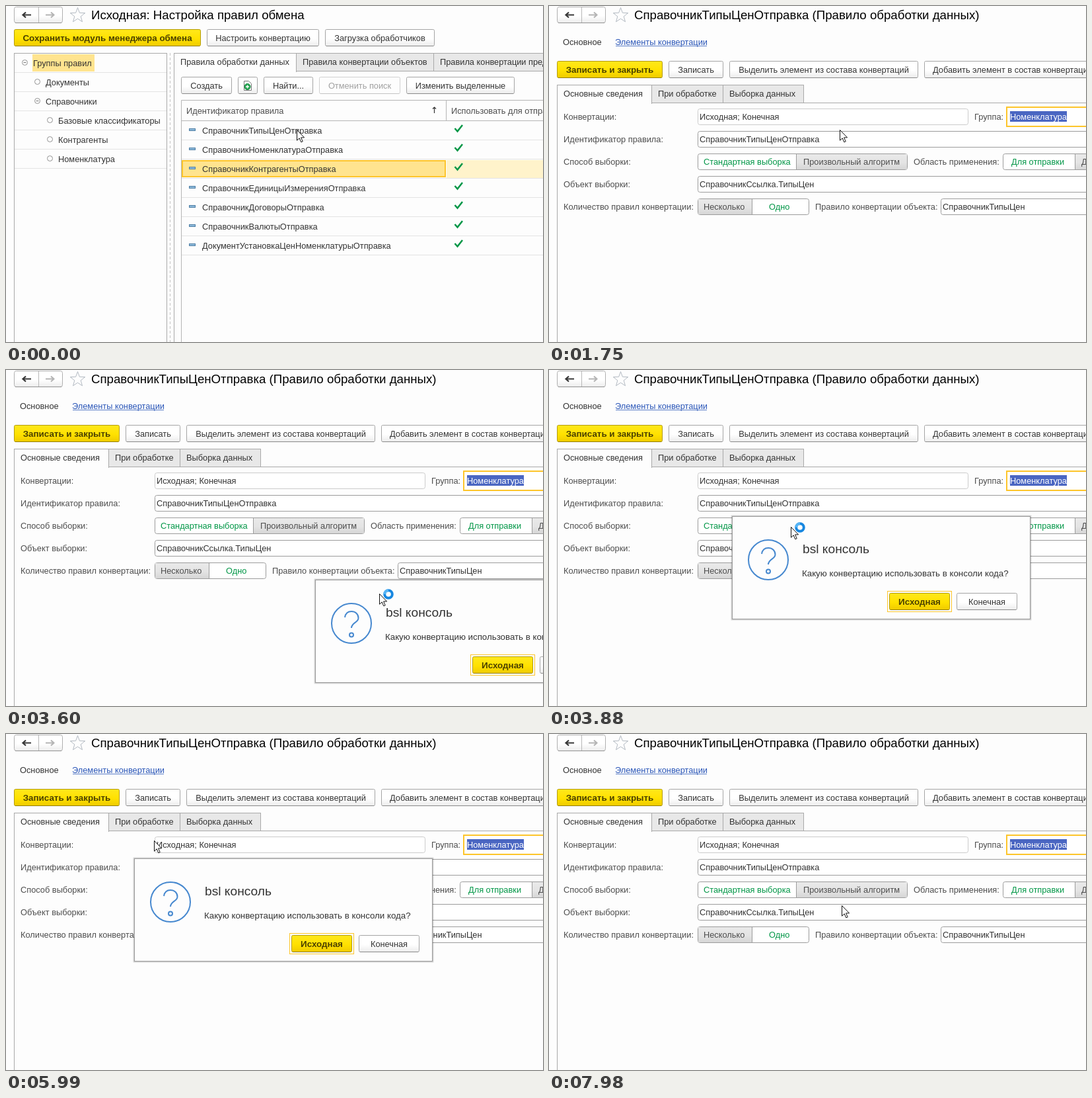
Write an HTML page that moves like this. It is 813 px wide and 508 px high and loops after 8 s.

```html
<!DOCTYPE html>
<html lang="ru">
<head>
<meta charset="utf-8">
<title>Правила обмена</title>
<style>
html, body { margin: 0; width: 100%; height: 100%; overflow: hidden; background: #fdfdfd; }
svg { display: block; width: 813px; height: 508px; }
text { font: 12.8px "Liberation Sans", Arial, sans-serif; fill: #333; white-space: pre; }
.title { font-size: 18.67px; fill: #000; }
.head { font-size: 19.2px; }
.ask { font-size: 13.3px; }
.label { fill: #4d4d4d; }
.bold { font-size: 13.4px; font-weight: bold; fill: #4a4000; }
.mid { text-anchor: middle; }
.off { fill: #a0a0a0; }
.green { fill: #009646; }
.link { fill: #2a56b8; }
.white { fill: #fff; }
</style>
</head>
<body>
<svg id="stage" viewBox="0 0 813 508" xmlns="http://www.w3.org/2000/svg"></svg>
<script>
const LOOP = 8000;
const stage = document.getElementById('stage');

// Drawing helpers
const text = (x, y, s, cls = '') => `<text x="${x - 1}" y="${y + 5}" class="${cls}">${s}</text>`;
const midText = (x, y, s, cls = '') => `<text x="${x}" y="${y + 5}" class="mid ${cls}">${s}</text>`;
const rect = (l, t, r, b, fill, stroke = 'none', rx = 0, w = 1) => {
  const o = stroke === 'none' ? 0 : w / 2;
  return `<rect x="${l + o}" y="${t + o}" width="${r - l - 2 * o}" height="${b - t - 2 * o}" rx="${rx}" fill="${fill}" stroke="${stroke}" stroke-width="${w}"/>`;
};
const path = (d, stroke, w = 1, fill = 'none', extra = '') =>
  `<path d="${d}" stroke="${stroke}" stroke-width="${w}" fill="${fill}" ${extra}/>`;
const circle = (x, y, r, stroke, w = 1, fill = 'none') =>
  `<circle cx="${x}" cy="${y}" r="${r}" stroke="${stroke}" stroke-width="${w}" fill="${fill}"/>`;
const group = (id, body) => `<g id="${id}">${body}</g>`;

const button = (l, t, r, s, kind = '') => {
  const b = t + 26, main = kind === 'main', off = kind === 'off';
  const edge = main ? '#b39b0c' : off ? '#d0d0d0' : '#a5a5a5';
  return rect(l, t, r, b, main ? 'url(#gold)' : off ? '#fdfdfd' : 'url(#plain)', edge, 2) +
    path(`M${l + 2} ${b - .5}H${r - 2}`, main ? '#94800a' : off ? '#c4c4c4' : '#8a8a8a') +
    midText((l + r) / 2, t + 13, s, main ? 'bold' : off ? 'off' : '');
};
const tab = (l, t, r, b, s, active) =>
  rect(l, t, r + 1, b + (active ? 1 : 0), active ? '#fdfdfd' : '#e8e8e8', '#a9a9a9') +
  (active ? rect(l + 1, b - 2, r, b + 2, '#fdfdfd') : '') + text(l + 11, t + 13, s);
const field = (l, y, r, s, edge = '#9c9c9c') =>
  rect(l, y - 12, r, y + 13, '#fff', edge, 3) + text(l + 4, y, s);
const toggle = (l, y, r, split, grayLeft) =>
  rect(l, y - 12, r, y + 13, '#fff', '#9c9c9c', 3) +
  (grayLeft ? rect(l + 1, y - 11, split, y + 12, 'url(#gray)') : rect(split, y - 11, r - 1, y + 12, 'url(#gray)')) +
  path(`M${split + .5} ${y - 12}V${y + 13}`, '#9c9c9c');

const defs = () => {
  const fade = (id, a, b, c) => `<linearGradient id="${id}" x2="0" y2="1"><stop stop-color="${a}"/>` +
    `<stop offset=".55" stop-color="${b}"/><stop offset="1" stop-color="${c}"/></linearGradient>`;
  return '<defs>' + fade('gold', '#ffe81c', '#ffe100', '#efcb00') + fade('plain', '#fff', '#fff', '#ececec') +
    fade('gray', '#e9e9e9', '#e4e4e4', '#d6d6d6') + fade('hover', '#f4f4f4', '#ededed', '#dcdcdc') + '</defs>';
};

const navBar = () =>
  rect(12, 1, 86, 26, 'url(#plain)', '#b0b0b0', 3) + path('M14 25.5H84', '#939393') +
  path('M49.5 2V25', '#b8b8b8') +
  path('M38 13.5H26M30 9.5L25.5 13.5L30 17.5', '#383838', 2.2) +
  path('M60 13.5H72M68 9.5L72.5 13.5L68 17.5', '#b4b4b4', 2) +
  path('M108.5 2.5L111.4 10.3L119.7 10.6L113.2 15.8L115.5 23.8L108.5 19.2L101.5 23.8L103.8 15.8L97.3 10.6L105.6 10.3Z', '#b3bac2');

const tree = () => {
  const items = ['Группы правил', 'Документы', 'Справочники', 'Базовые классификаторы', 'Контрагенты', 'Номенклатура'];
  const depth = i => i > 2 ? 2 : Math.min(i, 1);
  return rect(12, 71, 244, 520, '#fdfdfd', '#a9a9a9') + rect(40, 73, 134, 99, '#ffe48f') +
    items.map((s, i) => {
      const y = 86 + 29 * i, x = 28.5 + 19 * depth(i);
      return path(`M13 ${y + 14.5}H243`, '#e4e4e4') + circle(x, y - .5, 4, '#929292') +
        (i % 2 === 0 && i < 4 ? path(`M${x - 2} ${y - .5}H${x + 2}`, '#777') : '') +
        text(42 + 19 * depth(i), y, s);
    }).join('');
};

const selection = () => rect(667, 175, 813, 202, '#fff3cb') + rect(266, 175, 666, 201, '#ffe48f', '#fdc52b', 0, 2);

const table = () => {
  const rules = ['СправочникТипыЦен', 'СправочникНоменклатура', 'СправочникКонтрагенты', 'СправочникЕдиницыИзмерения',
    'СправочникДоговоры', 'СправочникВалюты', 'ДокументУстановкаЦенНоменклатуры'];
  return path('M813 142.5H265.5V508M266 173.5H813M666.5 143V173', '#b5b5b5') +
    text(274, 158, 'Идентификатор правила', 'label') + text(675, 158, 'Использовать для отправки', 'label') +
    path('M648.5 162V153M646 155.5L648.5 153L651 155.5', '#333', 1.2) +
    rules.map((_, i) => path(`M266 ${202.5 + 29 * i}H813`, '#e4e4e4')).join('') +
    group('picked', selection()) +
    rules.map((s, i) => {
      const y = 188 + 29 * i;
      return rect(277, y - 3, 287, y + 1, '#8db9da', '#4f7fa5') + text(298, y, s + 'Отправка') +
        path(`M679.5 ${y - 3}L683.5 ${y + 1.5}L691 ${y - 8}`, '#009646', 2.5);
    }).join('');
};

const listForm = () =>
  text(130, 15, 'Исходная: Настройка правил обмена', 'title') +
  button(12, 35, 295, 'Сохранить модуль менеджера обмена', 'main') +
  button(304, 35, 474, 'Настроить конвертацию') + button(483, 35, 649, 'Загрузка обработчиков') +
  tree() + path('M248.5 71V508', '#c4c4c4', 1, 'none', 'stroke-dasharray="4 3"') +
  path('M254.5 72V508M440 98.5H813', '#a9a9a9') +
  tab(647, 71, 850, 99, 'Правила конвертации предопределенных') +
  tab(439, 71, 647, 99, 'Правила конвертации объектов') +
  tab(254, 71, 439, 99, 'Правила обработки данных', true) +
  path('M254.5 95V110', '#a9a9a9') +
  button(265, 107, 342, 'Создать') + button(351, 107, 381, '') +
  path('M360.5 113.5H367.5L371.5 117.5V127.5H360.5Z', '#777', 1, '#fff') +
  circle(365.5, 122, 4.5, '#138a3d', 1, '#27a653') + path('M363 122H368M365.5 119.5V124.5', '#fff', 1.4) +
  button(390, 107, 465, 'Найти...') + button(474, 107, 597, 'Отменить поиск', 'off') +
  button(606, 107, 770, 'Изменить выделенные') + table();

const ruleForm = () =>
  text(130, 15, 'СправочникТипыЦенОтправка (Правило обработки данных)', 'title') +
  text(22, 54, 'Основное') + text(101, 54, 'Элементы конвертации', 'link') + path('M101 60.5H239', '#5e80c8') +
  button(12, 83, 172, 'Записать и закрыть', 'main') + button(181, 83, 264, 'Записать') +
  button(273, 83, 559, 'Выделить элемент из состава конвертаций') +
  button(568, 83, 840, '') + text(582, 96, 'Добавить элемент в состав конвертаций') +
  path('M12.5 146V508M155 146.5H813', '#a9a9a9') +
  tab(263, 119, 385, 147, 'Выборка данных') + tab(155, 119, 263, 147, 'При обработке') +
  tab(12, 119, 155, 147, 'Основные сведения', true) + path('M12.5 143V155', '#a9a9a9') +
  ['Конвертации:', 'Идентификатор правила:', 'Способ выборки:', 'Объект выборки:', 'Количество правил конвертации:']
    .map((s, i) => text(23, 167 + 34 * i, s, 'label')).join('') +
  field(225, 167, 635, 'Исходная; Конечная', '#cbcbcb') + text(645, 167, 'Группа:', 'label') +
  rect(692, 152, 840, 183, '#fff', '#fdc52b', 0, 2) + rect(698, 159, 784, 175, '#4a66c2') +
  text(699, 167, 'Номенклатура', 'white') + group('caret', rect(698, 159, 700, 175, '#222')) +
  field(225, 201, 840, 'СправочникТипыЦенОтправка') +
  toggle(225, 235, 543, 374) + text(235, 235, 'Стандартная выборка', 'green') + text(386, 235, 'Произвольный алгоритм', 'label') +
  text(553, 235, 'Область применения:', 'label') +
  toggle(687, 235, 900, 796) + text(701, 235, 'Для отправки', 'green') + text(807, 235, 'Для получения', 'label') +
  field(225, 269, 840, 'СправочникСсылка.ТипыЦен') +
  toggle(225, 303, 394, 307, true) + text(235, 303, 'Несколько', 'label') + text(334, 303, 'Одно', 'green') +
  text(404, 303, 'Правило конвертации объекта:', 'label') + field(593, 303, 840, 'СправочникТипыЦен');

const dialog = () =>
  rect(-2, -2, 454, 158, 'rgba(0,0,0,.08)', 'none', 2) + rect(-1, -1, 453, 157, 'rgba(0,0,0,.1)', 'none', 1) +
  rect(0, 0, 452, 156, '#fdfdfd', '#9a9a9a') +
  circle(55, 66, 30, '#4688cf', 2) +
  path('M45 57C46 51 50 48 55 48C61 48 65.5 52 65.5 58C65.5 65 55 65 55 73', '#4688cf', 2) +
  circle(55, 83.5, 3, '#4688cf', 2) +
  text(108, 51, 'bsl консоль', 'head') + text(107, 86, 'Какую конвертацию использовать в консоли кода?', 'ask') +
  rect(235, 113, 333, 145, 'none', '#fdc52b') + button(238, 116, 330, 'Исходная', 'main') +
  button(340, 116, 432, 'Конечная') +
  group('hovered', rect(341, 117, 431, 141, 'url(#hover)', 'none', 1) + midText(386, 129, 'Конечная'));

const ring = (id, x, y, r, w) => group(id, circle(x, y, r, '#1787e0', w, '#fff') +
  path(`M${x - r} ${y}A${r} ${r} 0 0 1 ${x} ${y - r}`, '#55b4f5', w));
const pointer = () =>
  group('arrow', path('M.5 .5V16.2L4.2 12.8L6.8 18.8L9.2 17.8L6.6 11.9H11.6Z', '#111', 1, '#fff')) +
  ring('busy', 14, 1, 5.8, 4) + ring('wait', 0, 0, 8.5, 4);

stage.innerHTML = defs() + rect(0, 0, 813, 508, '#fdfdfd') + navBar() + group('list', listForm()) +
  group('rule', ruleForm()) + group('dialog', dialog()) + group('pointer', pointer());

// Each run: first step time, last step time, places held step by step
const runs = [
  [0, 0, [440, 187]],
  [2180, 2300, [492, 232], [578, 309]],
  [2440, 2680, [598, 331], [606, 338], [608, 339]],
  [2830, 3600, [648, 384], [700, 440], [745, 487], [735, 470], [680, 410], [605, 352], [565, 338]],
  [3730, 3730, [445, 274]],
  [3880, 4140, [366, 237], [325, 222], [303, 212]],
  [4290, 4290, [289, 207]],
  [4690, 5470, [312, 206], [345, 200], [368, 184], [362, 160], [345, 150], [330, 162], [322, 182]],
  [5600, 6380, [300, 176], [268, 156], [238, 149], [224, 161], [246, 175], [290, 172], [330, 164]],
  [6510, 7290, [350, 182], [400, 210], [455, 240], [510, 268], [555, 292], [585, 306], [598, 312]],
  [7700, 7830, [574, 306], [523, 292]],
  [7980, 7980, [443, 259]]
];
const drags = [
  [3350, 3350, [468, 317]], [3730, 3730, [356, 257]],
  [3880, 4140, [277, 221], [235, 204], [212, 195]], [4290, 4290, [194, 188]]
];

const placeAt = (list, t) => {
  const [from, to, ...spots] = list.filter(r => r[0] <= t).pop() || list[0];
  const last = spots.length - 1;
  const step = last ? Math.floor((t - from) / (to - from) * last + .05) : 0;
  return spots[Math.max(0, Math.min(last, step))];
};
const el = id => document.getElementById(id);
const show = (id, on) => el(id).setAttribute('display', on ? 'inline' : 'none');
const move = (id, [x, y]) => el(id).setAttribute('transform', `translate(${x} ${y})`);

function draw(t) {
  const within = (a, b) => t >= a && t < b;
  const waiting = within(1600, 1750);
  show('list', t < 1750);
  show('rule', t >= 1750);
  move('picked', [0, t < 1340 ? 58 : 0]);
  show('caret', within(2440, 2680) || within(7700, 7830));
  show('dialog', within(3350, 7550));
  show('hovered', within(7030, 7550));
  move('dialog', placeAt(drags, t));
  move('pointer', placeAt(runs, t));
  show('arrow', !waiting);
  show('wait', waiting);
  show('busy', within(3220, 4140));
}

const start = performance.now();
function tick() {
  draw((performance.now() - start) % LOOP);
  requestAnimationFrame(tick);
}
draw(0);
requestAnimationFrame(tick);
</script>
</body>
</html>
```
